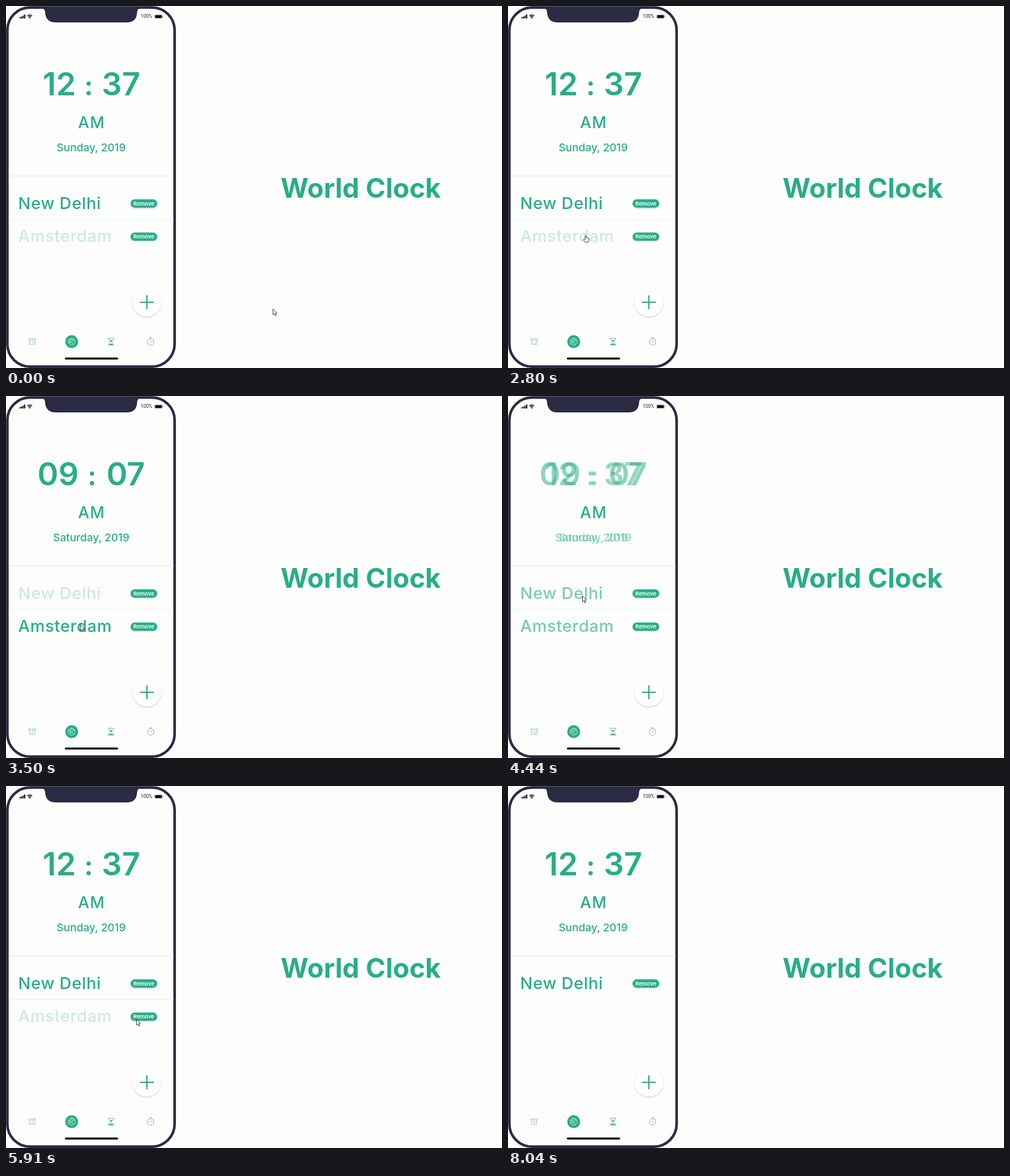
Write an HTML page that moves like this. It is 876 px wide and 640 px high and loops after 8070 ms.

```html
<!DOCTYPE html>
<html lang="en">
<head>
<meta charset="utf-8">
<title>World Clock</title>
<style>
  html, body { margin: 0; width: 100%; height: 100%; overflow: hidden; background: #fdfdfc; }
  svg { display: block; width: 876px; height: 640px; }
  text { font-family: Inter, "Open Sans", sans-serif; font-weight: 500; fill: #28ae87; }
  .mid { text-anchor: middle; }
  .time { font-size: 56px; font-weight: 600; }
  .colon { font-size: 46px; font-weight: 700; }
  .date { font-size: 19px; }
  .city { font-size: 29px; letter-spacing: .7px; }
  .label { font-size: 9.5px; font-weight: 600; fill: #fff; }
  .icon { fill: none; stroke: #72b9ae; stroke-width: 1; }
</style>
</head>
<body>
<svg viewBox="0 0 876 640">
  <defs>
    <filter id="shadow" x="-30%" y="-30%" width="160%" height="170%">
      <feDropShadow dx="0" dy="1.2" stdDeviation="1.2" flood-color="#345" flood-opacity=".3"/>
    </filter>
    <g id="remove">
      <rect x="220" y="-7.5" width="47" height="14.6" rx="7.3" fill="#28ae87" filter="url(#shadow)"/>
      <text class="label mid" x="243.5" y="3.4">Remove</text>
    </g>
  </defs>

  <!-- Phone -->
  <rect x="2.4" y="2.6" width="295.4" height="635" rx="40" fill="#fdfdfc" stroke="#2b2b43" stroke-width="4.6"/>
  <path d="M60 3Q69 4 69 11Q70 29 88 29H213Q231 29 231.5 11Q232 4 240 3Z" fill="#2b2b43"/>
  <path d="M24 22v-2.4h2v2.4zM26.7 22v-3.6h2v3.6zM29.4 22v-5.2h2v5.2zM32.1 22v-7h2v7z" fill="#111"/>
  <g fill="none" stroke="#111" stroke-width="1.4">
    <path d="M37.6 17.6Q41.9 13.8 46.2 17.6M39.3 19.4Q41.9 17.2 44.5 19.4"/>
    <circle cx="41.9" cy="20.9" r=".5"/>
  </g>
  <text x="238" y="21.4" style="font:8.4px Roboto,sans-serif;fill:#222">100%</text>
  <rect x="262" y="15.4" width="14.6" height="6.6" rx="1.6" fill="none" stroke="#999" stroke-width=".6"/>
  <rect x="263.3" y="16.2" width="12" height="5" rx=".8" fill="#000"/>
  <path d="M277.6 17.5v2.4" stroke="#999"/>
  <rect x="104" y="621.5" width="94" height="3.6" rx="1.8" fill="#000"/>
  <path d="M5 300.5H296" stroke="#dff0e4" stroke-width="1.4"/>

  <!-- Clock faces -->
  <text class="mid" x="151" y="216" font-size="28" letter-spacing="1">AM</text>
  <g id="delhi">
    <text class="time mid" x="94" y="158">12</text>
    <text class="colon mid" x="146" y="158">:</text>
    <text class="time mid" x="203" y="158">37</text>
    <text class="date mid" x="150.5" y="257.3">Sunday, 2019</text>
  </g>
  <g id="amsterdam">
    <text class="time mid" x="92" y="158">09</text>
    <text class="colon mid" x="152" y="158">:</text>
    <text class="time mid" x="211.5" y="158">07</text>
    <text class="date mid" x="150.5" y="257.3">Saturday, 2019</text>
  </g>

  <!-- City list -->
  <text id="row1" class="city" x="21.5" y="359.4">New Delhi</text>
  <use href="#remove" y="349.3"/>
  <g id="second">
    <path d="M5 377.5H296" stroke="#e6f1ea"/>
    <text id="row2" class="city" x="21.5" y="416.7">Amsterdam</text>
    <use href="#remove" y="408"/>
  </g>

  <!-- Add button -->
  <circle cx="248.8" cy="523.7" r="25.4" fill="#fefefe" filter="url(#shadow)"/>
  <path d="M236.6 523.8H261M248.8 511.6V536" stroke="#28a983" stroke-width="2.3"/>

  <!-- Tab bar -->
  <g class="icon">
    <g transform="translate(46.2 593.5)">
      <circle r="4.9"/>
      <path d="M0-3V0L2 2M-6.5-2.5Q-6.5-5.5-3.5-5.5M6.5-2.5Q6.5-5.5 3.5-5.5M-3.5 4L-5.5 6M3.5 4L5.5 6"/>
    </g>
    <g transform="translate(185.5 593.5)">
      <path d="M-6-6.2H6M-6 6.2H6M-4.5-6Q-4.5-2 0 0Q4.5-2 4.5-6M-4.5 6Q-4.5 2 0 0Q4.5 2 4.5 6"/>
      <path d="M-2.5-2.5H2.5L0 0ZM-3.8 5.5Q0 1 3.8 5.5Z" fill="#28a983" stroke="none"/>
    </g>
    <g transform="translate(255.4 594)">
      <circle r="5.6"/>
      <path d="M-2-7.6H2M0-7.5V-5.6M4-4.2L5.6-5.8M0 .5L2-2.2M0 .5L-1.5-1"/>
    </g>
  </g>
  <g transform="translate(116 593.4)">
    <circle r="11.3" fill="#28ae87"/>
    <g fill="none" stroke="#d8f3ea" stroke-width=".9">
      <circle r="6.1"/>
      <path d="M-5.5-2L-2-1.5L0-5.8M-2-1.5L-3 2L-5 3.4M-3 2L0 1L3 4.8M0 1L2.5-2.5L5.3-2.5M2.5-2.5L2-5"/>
    </g>
  </g>

  <text class="mid" x="626.5" y="338.5" font-size="47.5" style="font-weight:700">World Clock</text>

  <!-- Pointer -->
  <g id="pointer" fill="#fff" stroke="#222" stroke-width=".9" stroke-linejoin="round">
    <path id="arrow" d="M.5.5V10.8L2.8 8.7L4.5 12.6L6.3 11.8L4.6 8H7.6Z"/>
    <path id="hand" d="M0 7V1.2Q.9-.2 1.8 1.2V5L3.4 4.7L5 5.2L6.5 5.8Q7.3 6.1 7.1 8L6 12.5H.2L-2.7 8.4Q-2.8 6.8-1.2 7.2L0 8.4Z"/>
  </g>
</svg>
<script>
const LOOP = 8070, DIM = 0.23;
const el = id => document.getElementById(id);
const fade = (id, value) => el(id).setAttribute("opacity", value);
const clamp = v => Math.min(1, Math.max(0, v));
const easeOut = (t, start, length) => 1 - (1 - clamp((t - start) / length)) ** 2;
const mix = (a, b, k) => a + (b - a) * k;

// Pointer path: time, x, y
const path = [
  [0, 471, 535], [1250, 471, 535], [1450, 440, 500], [1800, 359, 415],
  [2150, 205, 402], [2400, 136, 405], [2900, 136, 405], [3050, 131, 404],
  [3700, 131, 404], [4150, 131, 353], [4950, 131, 353], [5200, 158, 372],
  [5600, 230, 412], [6250, 230, 412], [6740, 286, 378], [7150, 520, 220],
  [7540, 836, 78], [7570, 900, 50], [LOOP, 900, 50]
];
// Clicks put the plain arrow back while the screens dissolve
const busy = [[2900, 3650], [4300, 4950], [5860, 6600]];

function pointerAt(t) {
  const i = path.findIndex(p => p[0] > t);
  const [t0, x0, y0] = path[i - 1], [t1, x1, y1] = path[i];
  const k = (t - t0) / (t1 - t0);
  return [mix(x0, x1, k), mix(y0, y1, k)];
}

function draw(t) {
  const w = easeOut(t, 2930, 400) - easeOut(t, 4330, 400);
  fade("delhi", 1 - w);
  fade("amsterdam", w);
  fade("row1", mix(1, DIM, w));
  fade("row2", mix(DIM, 1, w));
  fade("second", 1 - easeOut(t, 5920, 400));

  const [x, y] = pointerAt(t);
  const over = x > 20 && x < 268 && y > 335 && y < 420;
  const hand = over && t < 6600 && !busy.some(([a, b]) => t >= a && t < b);
  el("pointer").setAttribute("transform", `translate(${x} ${y})`);
  fade("arrow", hand ? 0 : 1);
  fade("hand", hand ? 1 : 0);
}

const begin = performance.now();
function frame() {
  draw((performance.now() - begin) % LOOP);
  requestAnimationFrame(frame);
}
frame();
</script>
</body>
</html>
```
